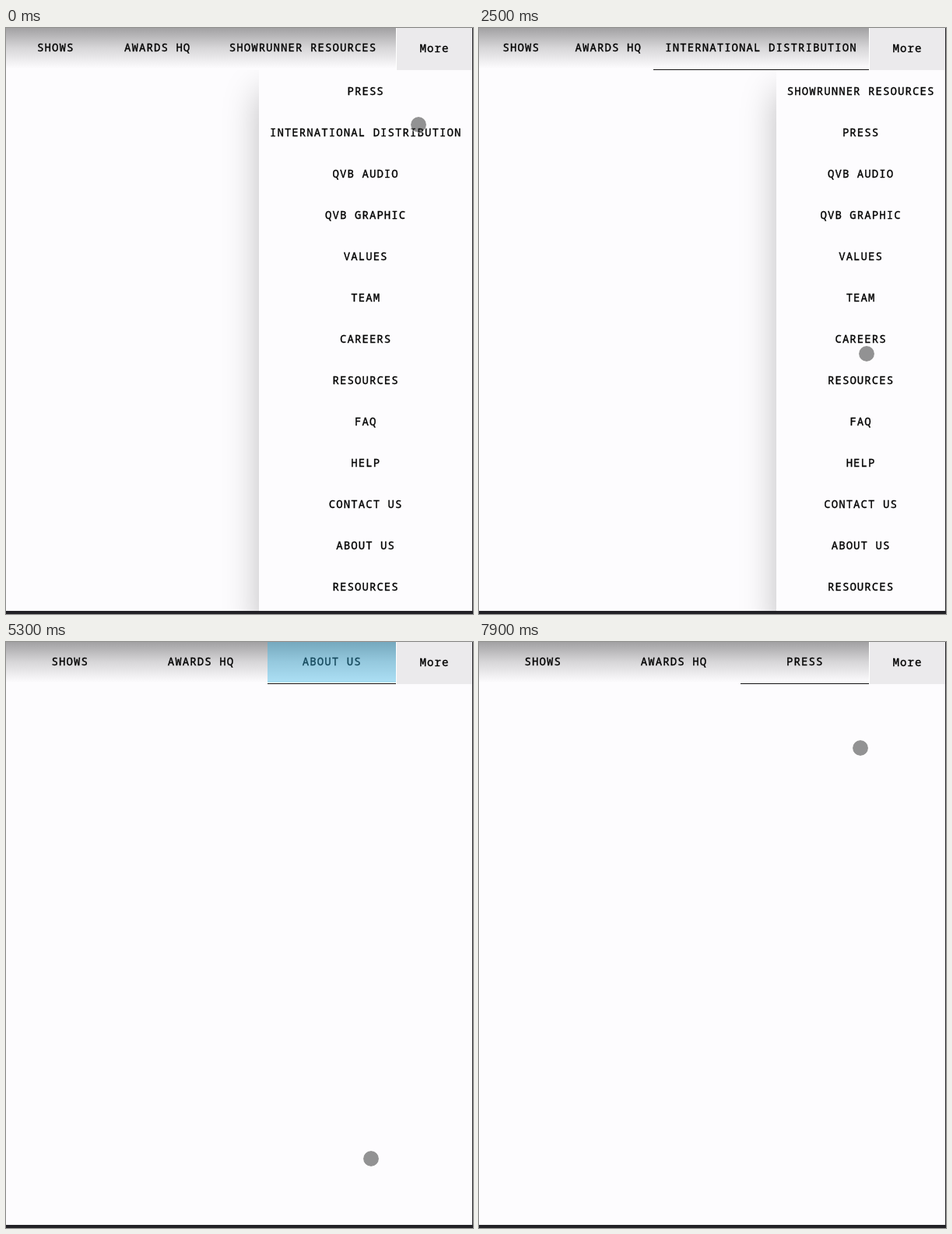
An HTML page that plays this animation: 600x752 px, repeating every 8 s.

```html
<!DOCTYPE html>
<html lang="en">
<head>
<meta charset="utf-8">
<title>Overflow menu</title>
<style>
  html, body { margin: 0; width: 100%; height: 100%; overflow: hidden; background: #fdfcfe; }
  #stage {
    position: absolute; inset: 0; overflow: hidden; color: #000;
    font: 500 14px "Noto Sans Mono", monospace; letter-spacing: 1.08px;
    -webkit-text-stroke: .35px; text-align: center; white-space: nowrap;
  }
  #menu, #header, #more, #flash, #underline, #right, #bottom, #touch {
    position: absolute; box-sizing: border-box;
  }
  #menu {
    top: 54px; right: 1px; bottom: 4px; padding: 0 13.6px; background: #fdfcfe;
    box-shadow: 0 28px 42px rgba(0, 0, 0, .25);
  }
  #menu p { margin: 0; line-height: 53px; }
  #header {
    display: flex; left: 0; top: 0; width: 599px; height: 54px; padding-right: 98px;
    background: linear-gradient(#a2a1a3, #d6d5d7 25px, #fdfcfe 52px);
  }
  .tab { position: relative; flex: 1 0 auto; line-height: 49.2px; }
  .tab span { display: inline-block; min-width: 78px; }
  #underline { left: 0; top: 53px; width: 100%; height: 1px; background: #111; }
  #flash { left: 0; top: 0; width: 100%; height: 52px; background: rgba(51, 181, 229, .4); }
  #more {
    right: 0; top: 0; width: 98px; height: 54px; line-height: 51.2px;
    background: #ebeaec; border-left: 1px solid #fff;
  }
  #right { right: 0; top: 0; width: 1px; height: 100%; background: #222126; }
  #bottom { left: 0; bottom: 0; width: 100%; height: 4px; background: #222126; }
  #touch {
    left: -11px; top: -11px; width: 22px; height: 22px; border-radius: 50%;
    background: rgba(40, 40, 40, .5) padding-box; border: 1px solid rgba(255, 255, 255, .5);
  }
</style>
</head>
<body>
<div id="stage">
  <div id="menu"></div>
  <div id="header">
    <div class="tab"><span>SHOWS</span></div>
    <div class="tab"><span>AWARDS HQ</span></div>
    <div class="tab"><span id="picked"></span><div id="underline"></div><div id="flash"></div></div>
    <div id="more">More</div>
  </div>
  <div id="right"></div>
  <div id="bottom"></div>
  <div id="touch"></div>
</div>
<script>
const LOOP = 8000, STEP = 100, FADE = 200;
const $ = id => document.getElementById(id);

const pages = ['SHOWRUNNER RESOURCES', 'PRESS', 'INTERNATIONAL DISTRIBUTION', 'QVB AUDIO',
  'QVB GRAPHIC', 'VALUES', 'TEAM', 'CAREERS', 'RESOURCES', 'FAQ', 'HELP', 'CONTACT US',
  'ABOUT US', 'RESOURCES'];

// Picking a page closes the menu and flashes its tab; the menu reopens at `opens`.
const picks = [
  { at: -FADE, page: 'SHOWRUNNER RESOURCES', opens: 0 },
  { at: 700, page: 'INTERNATIONAL DISTRIBUTION', opens: 2100 },
  { at: 3000, page: 'CAREERS', opens: 4100 },
  { at: 5300, page: 'ABOUT US', opens: 6500 },
  { at: 7600, page: 'PRESS', opens: LOOP }
];

// The pointer travels between the button and the menu rows.
const home = { x: 530, y: 124 };
const moves = [
  { from: 0, to: 300, x: 530, y: 142 },
  { from: 1100, to: 2000, x: 540, y: 30 },
  { from: 2000, to: 2500, x: 498, y: 418 },
  { from: 3000, to: 3800, x: 540, y: 39 },
  { from: 4000, to: 5100, x: 469, y: 663 },
  { from: 5300, to: 5900, x: 549, y: 25 },
  { from: 6400, to: 7100, x: 490, y: 136 }
];

function pointer(t) {
  let { x, y } = home;
  for (const move of moves) {
    const u = Math.min(1, Math.max(0, (t - move.from) / (move.to - move.from)));
    const eased = u * u * (3 - 2 * u);
    x += (move.x - x) * eased;
    y += (move.y - y) * eased;
  }
  return { x, y };
}

function showPick(pick) {
  $('picked').textContent = pick.page;
  $('underline').hidden = pick === picks[0];
  const chosen = pages.indexOf(pick.page);
  $('menu').innerHTML = pages.filter((_, i) => i !== chosen).map(s => `<p>${s}</p>`).join('');
}

let current;
function draw(now) {
  const t = Math.floor(now % LOOP / STEP) * STEP;
  const pick = picks.findLast(p => t >= p.at);
  if (pick !== current) showPick(current = pick);
  $('menu').hidden = t < pick.opens;
  $('flash').style.opacity = Math.max(0, 1 - (t - pick.at) / FADE);
  const { x, y } = pointer(t);
  $('touch').style.transform = `translate(${x}px, ${y}px)`;
}

const start = performance.now();
function tick() {
  draw(performance.now() - start);
  requestAnimationFrame(tick);
}
tick();
</script>
</body>
</html>
```
